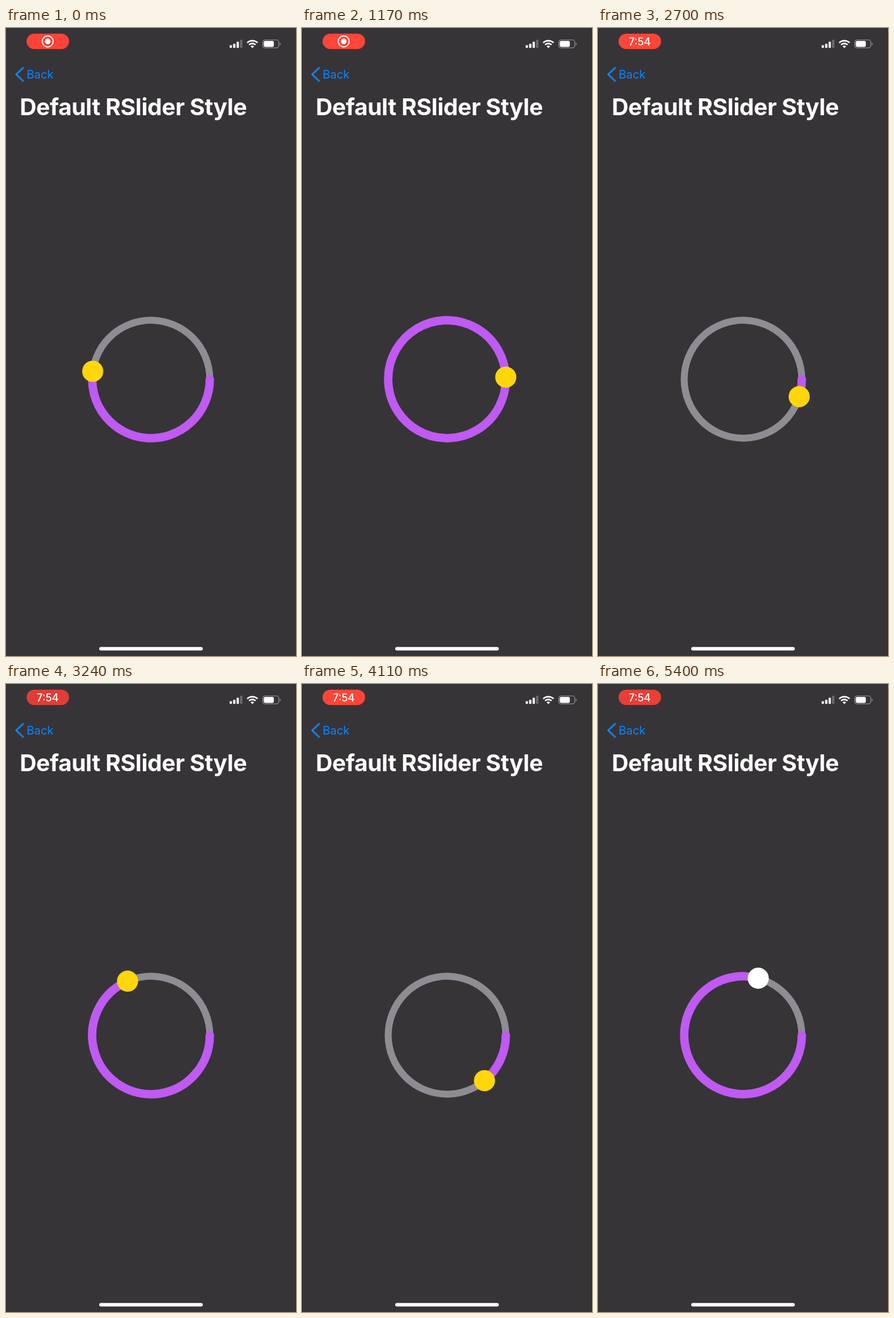
Animation, 500 px wide and 1080 px high, one loop 5.43 s. Source, as an HTML page:

```html
<!DOCTYPE html>
<html lang="en">
<head>
<meta charset="utf-8">
<title>Radial slider</title>
<style>
  html, body { margin: 0; width: 100%; height: 100%; overflow: hidden; background: #373437; }
  svg { display: block; width: 100vw; height: 100vh; }
  text { font-family: Inter, Roboto, sans-serif; }
</style>
</head>
<body>
<svg viewBox="0 0 500 1080" xmlns="http://www.w3.org/2000/svg">
  <rect width="500" height="1080" fill="#373437"/>
  <g id="edges" fill="#2a282a">
    <rect width="1" height="1080"/>
    <rect x="499" width="1" height="1080"/>
  </g>

  <rect id="pill" x="35.5" y="9.7" width="73.2" height="26.5" rx="13.2"/>
  <g id="record">
    <circle cx="71.9" cy="23" r="9.5" fill="none" stroke="#fff" stroke-width="1.8"/>
    <circle cx="71.9" cy="23" r="4.8" fill="#fff"/>
  </g>
  <text id="clock" x="72" y="29.6" font-size="18" font-weight="500" text-anchor="middle" fill="#fff">7:54</text>

  <g fill="#fff">
    <rect x="385.6" y="29.4" width="3.8" height="4.9" rx="1"/>
    <rect x="391.6" y="27" width="3.9" height="7.3" rx="1"/>
    <rect x="397.6" y="23.6" width="3.9" height="10.7" rx="1"/>
    <rect x="403.6" y="20.2" width="3.9" height="14.1" rx="1" opacity=".28"/>
  </g>
  <g fill="none" stroke="#fff" stroke-width="2.6">
    <path d="M415.9 25.4A13 13 0 0 1 433.7 25.4"/>
    <path d="M419.1 28.9A8.3 8.3 0 0 1 430.5 28.9"/>
  </g>
  <path d="M424.8 34.6L421.8 31.6A4.3 4.3 0 0 1 427.8 31.6Z" fill="#fff"/>
  <rect x="442.6" y="20.5" width="27.7" height="13.7" rx="4" fill="none" stroke="#949294" stroke-width="1.2"/>
  <rect x="444.4" y="22.3" width="17.4" height="10.1" rx="2.3" fill="#fff"/>
  <path d="M471.9 25A2.6 2.6 0 0 1 471.9 29.8Z" fill="#949294"/>

  <path d="M29.3 68.6L17.5 79.8L29.3 91" fill="none" stroke="#0a84ff" stroke-width="3" stroke-linecap="round" stroke-linejoin="round"/>
  <text x="35.6" y="87" font-size="20" letter-spacing="-.1" fill="#0a84ff">Back</text>
  <text x="23.7" y="150" font-size="40" font-weight="700" letter-spacing="-.46" fill="#fff">Default RSlider Style</text>

  <circle cx="250" cy="604" r="101.4" fill="none" stroke="#8f8d93" stroke-width="12"/>
  <path id="arc" fill="none" stroke="#bf5af2" stroke-width="14.5" stroke-linecap="round"/>
  <circle id="knob" r="18.2"/>
  <rect x="160.7" y="1064.4" width="178.6" height="6" rx="3" fill="#fff"/>
</svg>
<script>
const LOOP = 5430, STEP = 30;
const CX = 250, CY = 604, R = 101.4;

// [ms, degrees clockwise from the right], unwrapped across turns
const drag = [
  [450, 187.7], [1170, 358], [1575, 450], [1740, 471.7], [1960, 482], [2400, 448],
  [2700, 377.2], [3240, 246.5], [3855, 90], [4110, 50.4], [4210, 45], [4450, 89], [4930, 285]
];
// [ms, dimming of the recording pill]
const pulse = [
  [450, .12], [820, 1], [1170, 0], [1740, 1], [2250, .5], [2700, 0],
  [3240, .85], [3700, .5], [4110, 0], [4950, .65]
];

const $ = id => document.getElementById(id);
const clamp = (v, lo, hi) => Math.min(hi, Math.max(lo, v));

function slope(keys, i) {
  const a = keys[Math.max(i - 1, 0)], b = keys[Math.min(i + 1, keys.length - 1)];
  return (b[1] - a[1]) / (b[0] - a[0]);
}

// Cubic Hermite through the keys, held at both ends
function curve(keys, t) {
  const last = keys.length - 1;
  t = clamp(t, keys[0][0], keys[last][0]);
  let i = 0;
  while (i < last - 1 && t > keys[i + 1][0]) i++;
  const [t0, v0] = keys[i], [t1, v1] = keys[i + 1];
  const d = t1 - t0, u = (t - t0) / d, w = 1 - u;
  return w * w * ((1 + 2 * u) * v0 + u * d * slope(keys, i))
       + u * u * ((3 - 2 * u) * v1 - w * d * slope(keys, i + 1));
}

function draw(t) {
  const deg = ((curve(drag, t) % 360) + 360) % 360;
  const a = deg * Math.PI / 180;
  const x = CX + R * Math.cos(a), y = CY + R * Math.sin(a);
  $('arc').setAttribute('d', `M${CX + R} ${CY}A${R} ${R} 0 ${deg > 180 ? 1 : 0} 1 ${x} ${y}`);
  $('knob').setAttribute('cx', x);
  $('knob').setAttribute('cy', y);
  $('knob').setAttribute('fill', t < 4950 ? '#ffd60a' : '#fff');

  const dim = clamp(curve(pulse, t), 0, 1);
  $('pill').setAttribute('fill', `rgb(${255 - 35 * dim},${69 - 9 * dim},${58 - 5 * dim})`);
  const swap = clamp((t - 2100) / 240, 0, 1);
  $('record').setAttribute('opacity', 1 - swap);
  $('clock').setAttribute('opacity', swap);
  $('edges').setAttribute('opacity', t >= 450 && t < 5400 ? 1 : 0);
}

const start = performance.now();
function tick() {
  const t = (performance.now() - start) % LOOP;
  draw(Math.floor(t / STEP) * STEP);
  requestAnimationFrame(tick);
}
tick();
</script>
</body>
</html>
```
